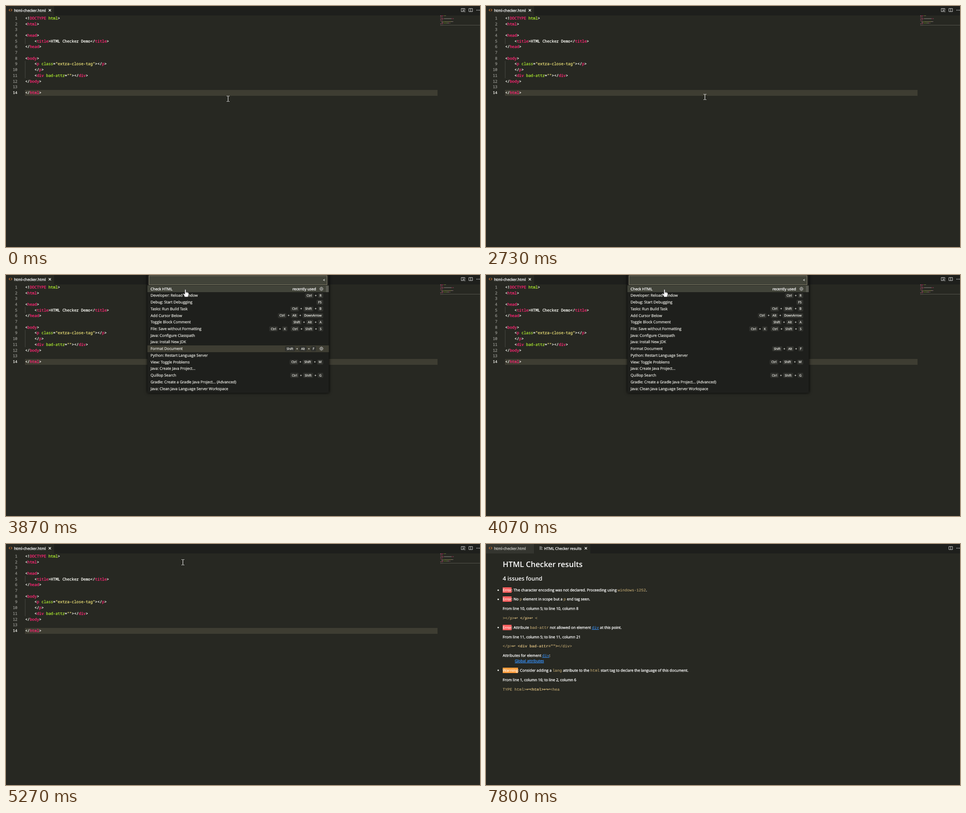
Animation, 1049 px wide and 534 px high, one loop 9.47 s. Source, as an HTML page with a canvas:

```html
<!DOCTYPE html>
<html lang="en">
<head>
<meta charset="utf-8">
<title>Editor demo</title>
<style>
html, body { margin: 0; width: 100%; height: 100%; overflow: hidden; background: #272822; }
canvas { display: block; width: 1049px; height: 534px; }
</style>
</head>
<body>
<canvas id="stage" width="1049" height="534"></canvas>
<script>
const ctx = document.getElementById('stage').getContext('2d');
const LOOP = 9470;
const UI = '"Open Sans", "Noto Sans", sans-serif';
const CODE = '"Noto Sans Mono", "DejaVu Sans Mono", monospace';
const COURIER = '"Liberation Mono", monospace';
const BG = '#272822', BAR = '#1e1f1c', ROW = '#414339', FG = '#f8f8f2';
const INK = { w: FG, p: '#f92672', g: '#a6e22e', y: '#e6db74' };

// Each piece starts with its colour key.
const source = [
  'w<!|pDOCTYPE|g html|w>', 'w<|phtml|w>', '', 'w<|phead|w>',
  'w    <|ptitle|w>HTML Checker Demo</|ptitle|w>', 'w</|phead|w>', '',
  'w<|pbody|w>', 'w    <|pp|g class|w=|y"extra-close-tag"|w></|pp|w>',
  'w    </|pp|w>', 'w    <|pdiv|g bad-attr|w=|y""|w></|pdiv|w>',
  'w</|pbody|w>', '', 'w</|phtml|w>'
].map(line => line ? line.split('|').map(s => [INK[s[0]], s.slice(1)]) : []);

// Label, then key chords separated by spaces.
const commands = [
  ['Check HTML'],
  ['Developer: Reload Window', 'Ctrl+R'],
  ['Debug: Start Debugging', 'F5'],
  ['Tasks: Run Build Task', 'Ctrl+Shift+B'],
  ['Add Cursor Below', 'Ctrl+Alt+DownArrow'],
  ['Toggle Block Comment', 'Shift+Alt+A'],
  ['File: Save without Formatting', 'Ctrl+K Ctrl+Shift+S'],
  ['Java: Configure Classpath'],
  ['Java: Install New JDK'],
  ['Format Document', 'Shift+Alt+F'],
  ['Python: Restart Language Server'],
  ['View: Toggle Problems', 'Ctrl+Shift+M'],
  ['Java: Create Java Project...'],
  ['Quillop Search', 'Ctrl+Shift+G'],
  ['Gradle: Create a Gradle Java Project... (Advanced)'],
  ['Java: Clean Java Language Server Workspace']
];

// Pointer stops: time, x, y.
const pointer = [
  [0, 491, 205], [70, 488, 204], [270, 487, 203], [400, 485, 202], [530, 484, 201],
  [3200, 484, 200], [3600, 468, 174], [3730, 441, 125], [3870, 397, 32],
  [4000, 395, 32], [4130, 393, 32], [4270, 392, 32], [4400, 391, 32], [5270, 391, 40]
];
// Hovered row: time, index.
const hover = [[0, -1], [3200, 12], [3730, 11], [3870, 9], [4000, 1], [4070, 0]];

const at = (stops, t) => stops.filter(s => s[0] <= t).pop();
const within = (t, ...spans) => spans.some(([a, b]) => t >= a && t < b);

function rect(x, y, w, h, color) {
  ctx.fillStyle = color;
  ctx.fillRect(x, y, w, h);
}

// Regular faces get a hairline outline to look as sturdy as screen-hinted type.
function text(s, x, y, color = FG, size = 8.3, family = UI, weight = 400) {
  y = Math.round(y);
  ctx.font = `${weight} ${size}px ${family}`;
  ctx.fillStyle = color;
  ctx.fillText(s, x, y);
  if (weight < 600 && family !== COURIER) {
    ctx.strokeStyle = color;
    ctx.lineWidth = 0.3;
    ctx.lineJoin = 'round';
    ctx.strokeText(s, x, y);
  }
  return ctx.measureText(s).width;
}

function stroke(path, x, y, color, width = 1) {
  ctx.save();
  ctx.translate(x, y);
  ctx.strokeStyle = color;
  ctx.lineWidth = width;
  ctx.lineJoin = 'miter';
  ctx.stroke(new Path2D(path));
  ctx.restore();
}

function htmlTab(active) {
  rect(0, 0, 106.5, 21, active ? BG : '#34352f');
  stroke('M-1 -2.5L-3.2 0L-1 2.5M1 -2.5L3.2 0L1 2.5', 10, 9, '#e37933', 1.1);
  text('html-checker.html', 18, 13, active ? '#ffffff' : '#ccccc7', 8.25);
}

const cross = x => stroke('M-2.5 -2.5L2.5 2.5M2.5 -2.5L-2.5 2.5', x, 9.5, FG, 1.2);

function actions() {
  stroke('M-4 -3.5H4V3.5H-4ZM0 -3.5V3.5', 1028.5, 9, '#c5c5c5');
  for (let i = 0; i < 3; i++) rect(1041 + i * 3, 8.5, 1.6, 1.6, '#c5c5c5');
}

function minimap() {
  source.forEach((line, i) => {
    let x = 961;
    const y = 21 + i * 1.63;
    ctx.globalAlpha = 0.5;
    for (const [color, s] of line) {
      const lead = s.length - s.trimStart().length;
      rect(x + lead * 0.83, y, (s.length - lead) * 0.83, 1, color);
      x += s.length * 0.83;
    }
    ctx.globalAlpha = 1;
  });
  rect(961, 42, 88, 1, '#55554c');
}

function editor(caret) {
  rect(0, 0, 1049, 21, BAR);
  htmlTab(true);
  cross(97);
  stroke('M0 3.5H-4V-3.5H4V0M0 -3.5V3.5', 1011.5, 9, '#c5c5c5');
  stroke('M4 2A1.8 1.8 0 1 1 .4 2A1.8 1.8 0 1 1 4 2M3.4 3.2L4.8 4.8', 1011.5, 9, '#c5c5c5', 0.9);
  actions();
  rect(42, 186, 913, 13, '#3e3d32');
  source.forEach((line, i) => {
    const y = 29.8 + i * 12.7;
    ctx.textAlign = 'right';
    text(i + 1, 25.2, y, i === 13 ? '#d8d8d2' : '#90908a', 8.6, CODE, i === 13 ? 600 : 400);
    ctx.textAlign = 'left';
    let x = 42.4;
    for (const [color, s] of line) x += text(s, x, y, color, 8.6, CODE, 500);
  });
  rect(42, 71, 1, 13, '#464741');
  rect(42, 122, 1, 38, '#464741');
  if (caret) rect(79, 186, 1, 13, FG);
  minimap();
}

function gear(x, y) {
  ctx.save();
  ctx.translate(x, y);
  ctx.strokeStyle = '#c5c5c5';
  ctx.lineWidth = 0.9;
  ctx.beginPath();
  ctx.arc(0, 0, 3.2, 0, 7);
  ctx.moveTo(1.4, 0);
  ctx.arc(0, 0, 1.4, 0, 7);
  for (let i = 0; i < 8; i++) {
    const c = Math.cos(i * Math.PI / 4), s = Math.sin(i * Math.PI / 4);
    ctx.moveTo(c * 3.2, s * 3.2);
    ctx.lineTo(c * 4.7, s * 4.7);
  }
  ctx.stroke();
  ctx.restore();
}

// Keycaps are laid out from the right edge.
function keycaps(chords, right, y) {
  for (const chord of chords.split(' ').reverse()) {
    chord.split('+').reverse().forEach((key, i) => {
      if (i) {
        text('+', right - 7, y + 2.5, '#dcdcd6', 7);
        right -= 10;
      }
      ctx.font = `7px ${UI}`;
      const w = ctx.measureText(key).width + 7.2;
      ctx.fillStyle = '#30312d';
      ctx.beginPath();
      ctx.roundRect(right - w, y - 5.2, w, 11, 2);
      ctx.fill();
      text(key, right - w + 3.6, y + 2.5, '#dcdcd6', 7);
      right -= w;
    });
    right -= 7.5;
  }
}

function palette(t) {
  const pressed = t >= 4930;
  const hovered = at(hover, t)[1];
  ctx.save();
  ctx.shadowColor = '#000000';
  ctx.shadowBlur = 6;
  rect(313, -4, 401.5, 265, BAR);
  ctx.restore();
  if (!pressed) rect(316, 1, 395, 21, '#85816c');
  rect(317, 2, 393, 19, ROW);
  text('<', 701.5, 14.2, FG, 8);
  if (within(t, [3130, 3870], [4130, 4670])) rect(700, 5, 1, 12, FG);
  commands.forEach(([label, keys], i) => {
    const y = 30.7 + i * 14.72;
    const lit = i === 0 || i === hovered;
    if (lit) rect(313, Math.round(y - 7.4), 401.5, 15, i ? '#3e3d32' : ROW);
    text(label, 320, y + 3, i ? '#deded8' : '#ffffff', 8.35);
    if (keys) keycaps(keys, lit ? 686 : 702, y);
    if (lit) gear(698, y);
  });
  ctx.textAlign = 'right';
  text('recently used', 686, 33.7, '#ffffff', 8.35);
  ctx.textAlign = 'left';
  if (pressed) rect(313, 38, 401.5, 1, '#75715e');
  if (t >= 3270) rect(708, 24, 6, 14, '#595a52');
}

const SAND = '#d7ba7d', BLUE = '#3794ff';
// Colour, size, family, weight, badge colour.
const styles = {
  t: ['#ffffff', 8.27, UI, 400],
  b: [FG, 8.1, UI, 700],
  e: [FG, 8, UI, 600, '#ff5f5f'],
  w: [FG, 8.4, UI, 600, '#ff9e3d'],
  c: [SAND, 8.7, COURIER, 400],
  s: [SAND, 8.7, COURIER, 700],
  r: [SAND, 8.6, '"DejaVu Sans", sans-serif', 400],
  l: [BLUE, 8.7, COURIER, 400],
  g: [BLUE, 8.27, UI, 400]
};

// Runs separated by |, each starting with its style key.
function flow(x, y, runs) {
  for (const run of runs.split('|')) {
    const key = run[0], s = run.slice(1);
    const [color, size, family, weight, badge] = styles[key];
    if (badge) {
      ctx.font = `${weight} ${size}px ${family}`;
      rect(x, Math.round(y) - 9, ctx.measureText(s).width, 12, badge);
    }
    const w = text(s, x, y, color, size, family, weight);
    if (key === 'l' || key === 'g') rect(x, Math.round(y) + 1, w, 1, BLUE);
    x += w;
  }
}

function bullet(y) {
  ctx.fillStyle = FG;
  ctx.beginPath();
  ctx.arc(27, y, 1.6, 0, 7);
  ctx.fill();
}

function report() {
  text('HTML Checker results', 37, 51, '#ffffff', 16.9, UI, 600);
  text('4 issues found', 37, 81, '#ffffff', 12.7, UI, 600);
  [102.3, 122.7, 185, 279.8].forEach(bullet);
  [
    [105, 'eError|b:|t The character encoding was not declared. Proceeding using |cwindows-1252|t.'],
    [125.2, 'eError|b:|t No |cp|t element in scope but a |cp|t end tag seen.'],
    [146, 'tFrom line 10, column 5; to line 10, column 8'],
    [167, 'c></p>|r↩|c |s</p>|r↩|c <'],
    [187.8, 'eError|b:|t Attribute |cbad-attr|t not allowed on element |ldiv|t at this point.'],
    [208.7, 'tFrom line 11, column 5; to line 11, column 21'],
    [229, 'c</p>|r↩|c |s<div bad-attr="">|c</div>'],
    [249.8, 'tAttributes for element |ldiv|t:'],
    [282.7, 'wWarning|b:|t Consider adding a |clang|t attribute to the |chtml|t start tag to declare the language of this document.'],
    [303.5, 'tFrom line 1, column 16; to line 2, column 6'],
    [324.6, 'cTYPE html>|r↩|s<html>|r↩↩|c<hea']
  ].forEach(([y, runs]) => flow(37, y, runs));
  flow(63.7, 261.8, 'gGlobal attributes');
}

function results(t) {
  rect(0, 0, 1049, 21, BAR);
  htmlTab(false);
  rect(107.3, 0, 123.5, 21, BG);
  stroke('M0 0H5M0 2H7M0 4H5M0 6H7', 118.3, 6, '#c5c5c5', 0.9);
  text('HTML Checker results', 128.7, 13, '#ffffff', 8.2);
  cross(221);
  actions();
  if (t >= 7800) report();
}

const HAND = 'M-1.3 .6Q0 -1 1.3 .6V5.2L3.6 5.6L5.8 6.4L7.4 7.8V11.8L6 14.6V16.8H-1.6V15L-4.9 10.4Q-5.3 8.2 -3.2 8.8L-1.3 10.8Z';
const FINGERS = 'M1.3 5.2V8M3.6 5.6V8.3M5.8 6.4V8.6';
const BEAM = 'M-3 -6H-.7M.7 -6H3M0 -5.5V5.5M-3 6H-.7M.7 6H3';

function drawPointer(t) {
  const [, x, y] = at(pointer, t);
  if (within(t, [3200, 5270])) {
    ctx.save();
    ctx.translate(x, y);
    ctx.fillStyle = '#ffffff';
    ctx.fill(new Path2D(HAND));
    ctx.restore();
    stroke(HAND + FINGERS, x, y, '#111111', 0.7);
  } else {
    stroke(BEAM, x + 0.5, y + 0.5, '#ffffff');
  }
}

function draw(t) {
  ctx.textRendering = 'geometricPrecision';
  ctx.textAlign = 'left';
  rect(0, 0, 1049, 534, BG);
  if (t >= 6330) return results(t);
  editor(within(t, [1200, 1800], [2330, 2730]));
  if (within(t, [3130, 5200])) palette(t);
  drawPointer(t);
}

const start = performance.now();
function tick() {
  draw((performance.now() - start) % LOOP);
  requestAnimationFrame(tick);
}
tick();
</script>
</body>
</html>
```
